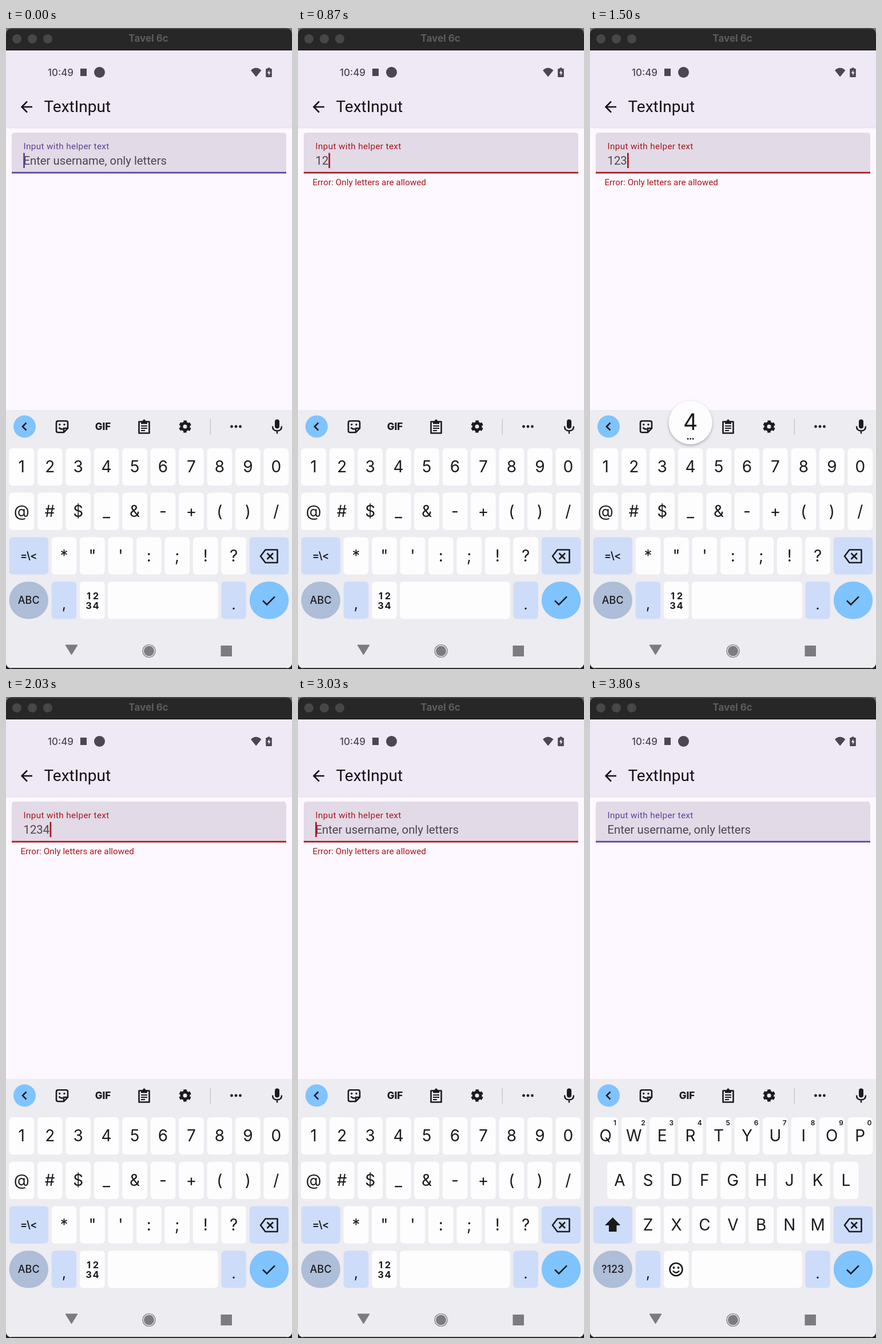
An HTML page that plays this animation: 500x1121 px, repeating every 3830 ms.

```html
<!DOCTYPE html>
<html lang="en">
<head>
<meta charset="utf-8">
<title>Text input with validation</title>
<style>
  html, body { margin: 0; width: 100%; height: 100%; overflow: hidden; background: #222; }
  svg { display: block; width: 500px; height: 1121px; }
  text { font-family: Roboto, sans-serif; white-space: pre; }
  .kb text, .ui { font-family: Inter, sans-serif; }
  .kb text { fill: #1b1b1f; text-anchor: middle; }
  .line { fill: none; stroke: #1b1b1f; stroke-width: 2.6; }
  .dark { fill: #1b1b1f; }
</style>
</head>
<body>
<svg viewBox="0 0 500 1121">
  <defs>
    <linearGradient id="fall" x2="0" y2="1">
      <stop stop-color="#e6dfec"/><stop offset="1" stop-color="#fdf8ff"/>
    </linearGradient>
    <filter id="soft" x="-30%" y="-30%" width="160%" height="160%">
      <feDropShadow dx="0" dy="2" stdDeviation="2.5" flood-color="#000" flood-opacity=".3"/>
    </filter>
    <clipPath id="win"><rect width="500" height="1120" rx="10"/></clipPath>
  </defs>

  <rect width="500" height="30" fill="#77777a"/>
  <g clip-path="url(#win)">
    <rect width="500" height="1121" fill="#fdf8ff"/>
    <!-- window bar -->
    <rect width="500" height="39" fill="#272727"/>
    <rect y=".5" width="500" height="1.2" fill="#5c5c5c"/>
    <rect y="38" width="500" height="1.6" fill="#0c0c0c"/>
    <g fill="#474747">
      <circle cx="19" cy="19" r="8"/><circle cx="46" cy="19" r="8"/><circle cx="73" cy="19" r="8"/>
    </g>
    <text class="ui" x="249" y="24" font-size="17" font-weight="700" fill="#5d5d5d" text-anchor="middle">Tavel 6c</text>

    <!-- status and app bar -->
    <rect y="39.6" width="500" height="133.4" fill="#efe8f5"/>
    <rect y="39.6" width="500" height="1.4" fill="#f8f4fb"/>
    <rect y="173" width="500" height="4" fill="url(#fall)"/>
    <g fill="#4b4651">
      <text class="ui" x="73" y="83.5" font-size="17" font-weight="500">10:49</text>
      <rect x="130" y="71" width="11" height="13"/>
      <circle cx="163.5" cy="77.5" r="9.5"/>
      <path d="M428 74Q437 65.5 446.500 74L437.200 85.500Z"/>
      <path d="M457.500 69.500h4v1.500h2q1.300 0 1.300 1.300v12.400q0 1.300-1.300 1.300h-8q-1.300 0-1.300-1.300V72.300q0-1.300 1.300-1.300h2z"/>
    </g>
    <path d="M460.300 73.500l-3.500 5.500h2.300v4l3.500-5.500h-2.300z" fill="#efe8f5"/>
    <path d="M46 138H28M37 128.500L27.500 138L37 147.500" fill="none" stroke="#151317" stroke-width="2.5"/>
    <text x="66.500" y="147" font-size="28" fill="#131116">TextInput</text>

    <!-- text field -->
    <path d="M10 254V188q0-5 5-5H485q5 0 5 5V254z" fill="#e2dae6"/>
    <rect id="rule" x="10" y="251.700" width="480" height="2.700"/>
    <text id="label" x="30.500" y="211.500" font-size="15.27" letter-spacing=".36">Input with helper text</text>
    <text id="value" x="30.500" y="239.300" font-size="20.3" fill="#4b4651"></text>
    <rect id="caret" y="218.500" width="2.700" height="26.500"/>
    <text id="helper" x="25.500" y="275" font-size="15.27" fill="#a9171c">Error: Only letters are allowed</text>

    <!-- keyboard -->
    <rect y="668" width="500" height="453" fill="#edecf1"/>
    <g class="kb">
      <circle cx="32.500" cy="697" r="19.500" fill="#7fc3ff"/>
      <path class="line" d="M35.500 690.500L29 697L35.500 703.500"/>
      <path class="line" d="M91 687.300H105q3 0 3 3V700L101 707.300H91q-3 0-3-3V690.300q0-3 3-3zM101 707V700H108"/>
      <path class="line" stroke-width="2" d="M92.500 698.500q3 4 7 2.500"/>
      <circle class="dark" cx="93.800" cy="693.500" r="1.700"/><circle class="dark" cx="102" cy="693.500" r="1.700"/>
      <text x="169.500" y="703" font-size="17" font-weight="800">GIF</text>
      <path class="line" stroke-width="2.400" d="M232.500 688.500h18v20h-18z" stroke-linejoin="round"/>
      <path class="dark" d="M236 687.500h3q.500-3 2.500-3t2.500 3h3v5h-11z"/>
      <path class="line" style="stroke-width:2" d="M236 696h11M236 700h11M236 704h7"/>
      <circle class="line" cx="313" cy="697" r="6" style="stroke-width:5"/>
      <circle class="line" cx="313" cy="697" r="9" style="stroke-width:3.600" stroke-dasharray="5.400 4.025" transform="rotate(12.800 313 697)"/>
      <rect x="356.700" y="683" width="1.300" height="28" fill="#c6c5ca"/>
      <circle class="dark" cx="394.500" cy="697" r="2.400"/><circle class="dark" cx="402" cy="697" r="2.400"/><circle class="dark" cx="409.500" cy="697" r="2.400"/>
      <rect class="dark" x="470" y="684.500" width="8" height="16" rx="4"/>
      <path class="line" style="stroke-width:2.400" d="M466 696.500q0 8 8 8t8-8M474 704v5.500"/>

      <g id="keys"></g>
      <g id="symbols"></g>
      <g id="letters">
        <path class="dark" d="M39.700 910L53.300 924H46.500V935H33V924H26z"/>
        <circle class="line" cx="150.500" cy="1001" r="11"/>
        <circle class="dark" cx="146.500" cy="998" r="1.900"/><circle class="dark" cx="154.500" cy="998" r="1.900"/>
        <path class="line" style="stroke-width:2.400" d="M145 1003.500q5.500 6.500 11 0"/>
      </g>
      <path class="line" d="M453.500 912.500H474.500V935H453.500L445 923.700z" stroke-linejoin="round"/>
      <path class="line" d="M456.500 918.500L467 929M467 918.500L456.500 929"/>
      <path class="line" d="M449 1001.500L456 1008.300L470 994.300"/>
      <g id="popup">
        <circle cy="690" r="38" fill="#fdfdfe" filter="url(#soft)"/>
        <text id="digit" y="703" font-size="39"></text>
        <circle class="dark" cx="-4.500" cy="718.500" r="1.400"/><circle class="dark" cy="718.500" r="1.400"/><circle class="dark" cx="4.500" cy="718.500" r="1.400"/>
      </g>
    </g>

    <!-- navigation bar -->
    <g fill="#7c7b7f">
      <path d="M104 1079H125L114.500 1096z" stroke="#7c7b7f" stroke-linejoin="round"/>
      <circle cx="250" cy="1089.500" r="9"/>
      <circle cx="250" cy="1089.500" r="11" fill="none" stroke="#7c7b7f" stroke-width="1.200"/>
      <rect x="375.500" y="1080" width="19.500" height="19"/>
    </g>
    <rect y="1119" width="500" height="2" fill="#3b3b3d"/>
  </g>
</svg>
<script>
const LOOP = 3830, PITCH = 49.44;
const WHITE = '#fdfdfe', BLUE = '#cdddf9', SLATE = '#aebdd8', SKY = '#7fc3ff';
const PURPLE = '#5f4099', RED = '#a9171c';
const $ = id => document.getElementById(id);

function add(parent, tag, attrs, content = '') {
  const el = document.createElementNS('http://www.w3.org/2000/svg', tag);
  for (const name in attrs) el.setAttribute(name, attrs[name]);
  el.textContent = content;
  return parent.appendChild(el);
}
const key = (parent, x, y, width, fill, rx = 6) =>
  add(parent, 'rect', { x, y, width, height: 65.2, rx, fill });
const glyph = (parent, x, y, size, weight, char) =>
  add(parent, 'text', { x, y, 'font-size': size, 'font-weight': weight }, char);

// A row of equal keys; x is the left edge of the first one.
function row(parent, x, y, chars) {
  [...chars].forEach((char, i) => {
    key(parent, x + i * PITCH, y, 43.6, WHITE);
    glyph(parent, x + 21.8 + i * PITCH, y + 42, 28, 400, char);
  });
}

const keys = $('keys'), symbols = $('symbols'), letters = $('letters');
key(keys, 5.5, 890.5, 68.5, BLUE);
const erase = key(keys, 425.8, 890.5, 68.5, BLUE);
const mode = key(keys, 5.5, 968.2, 68.5, SLATE, 32.6);
key(keys, 79.7, 968.2, 43.6, BLUE);
key(keys, 129.1, 968.2, 43.6, WHITE);
key(keys, 178, 968.2, 192.5, WHITE);
key(keys, 376.3, 968.2, 43.6, BLUE);
key(keys, 425.8, 968.2, 68.5, SKY, 32.6);
glyph(keys, 101.5, 1016, 26, 400, ',');
glyph(keys, 398, 1016.5, 26, 400, '.');

row(symbols, 5.5, 735, '1234567890');
row(symbols, 5.5, 812.8, '@#$_&-+()/');
row(symbols, 79.7, 890.5, '*"\':;!?');
glyph(symbols, 39.7, 929, 18, 600, '=\\<');
glyph(symbols, 39.7, 1007, 18, 500, 'ABC');
['1', '2', '3', '4'].forEach((n, i) =>
  glyph(symbols, 144.5 + i % 2 * 12.5, i < 2 ? 998.5 : 1015.5, 16.5, 700, n));

row(letters, 5.5, 735, 'QWERTYUIOP');
row(letters, 30.2, 812.8, 'ASDFGHJKL');
row(letters, 79.7, 890.5, 'ZXCVBNM');
glyph(letters, 39.7, 1007, 18, 500, '?123');
[...'1234567890'].forEach((n, i) => glyph(letters, 43.5 + i * PITCH, 749, 12, 600, n));

// [time, number of digits in the field]
const edits = [[-300, 0], [270, 1], [770, 2], [1190, 3], [1590, 4],
               [2400, 3], [2810, 2], [2900, 1], [2990, 0]];
const taps = [120, 620, 1040, 1440];
const TAP = 185, ERROR_IN = 295, ERROR_OUT = 3050, FADE = 150, SWITCH = 3180;

const within = (t, a, b) => t >= a && t < b;
const progress = (t, start) => Math.min(1, Math.max(0, (t - start) / FADE));
const smooth = p => p * p * (3 - 2 * p);
const show = (el, on) => el.style.display = on ? '' : 'none';

function render(t) {
  const [since, count] = edits.filter(e => e[0] <= t).pop();
  const bad = within(t, ERROR_IN, ERROR_OUT);
  const color = bad ? RED : PURPLE;
  for (const id of ['rule', 'label', 'caret']) $(id).setAttribute('fill', color);

  $('value').textContent = count ? '1234'.slice(0, count) : 'Enter username, only letters';
  $('caret').setAttribute('x', 30.2 + 11.6 * count);
  show($('caret'), Math.floor((t - since) / 500) % 2 === 0 || count === 0 && t < 270);

  const enter = progress(t, ERROR_IN);
  const wiggle = bad ? 5 * (1 - Math.abs(2 * enter - 1)) : 0;
  $('label').setAttribute('transform', `translate(${wiggle} 0)`);
  const seen = smooth(enter) - smooth(progress(t, ERROR_OUT));
  $('helper').setAttribute('opacity', seen);
  $('helper').setAttribute('transform', `translate(0 ${(seen - 1) * 9})`);

  const tap = taps.findIndex(s => within(t, s, s + TAP));
  show($('popup'), tap >= 0);
  if (tap >= 0) {
    const x = Math.max(38, 27.3 + tap * PITCH);
    $('popup').setAttribute('transform', `translate(${x} 0)`);
    $('digit').textContent = tap + 1;
  }
  erase.setAttribute('fill', within(t, 2390, 3010) ? SLATE : BLUE);
  mode.setAttribute('fill', within(t, 3100, SWITCH) ? '#98a6c2' : SLATE);
  show(symbols, t < SWITCH);
  show(letters, t >= SWITCH);
}

function tick() {
  render(performance.now() % LOOP);
  requestAnimationFrame(tick);
}
tick();
</script>
</body>
</html>
```
